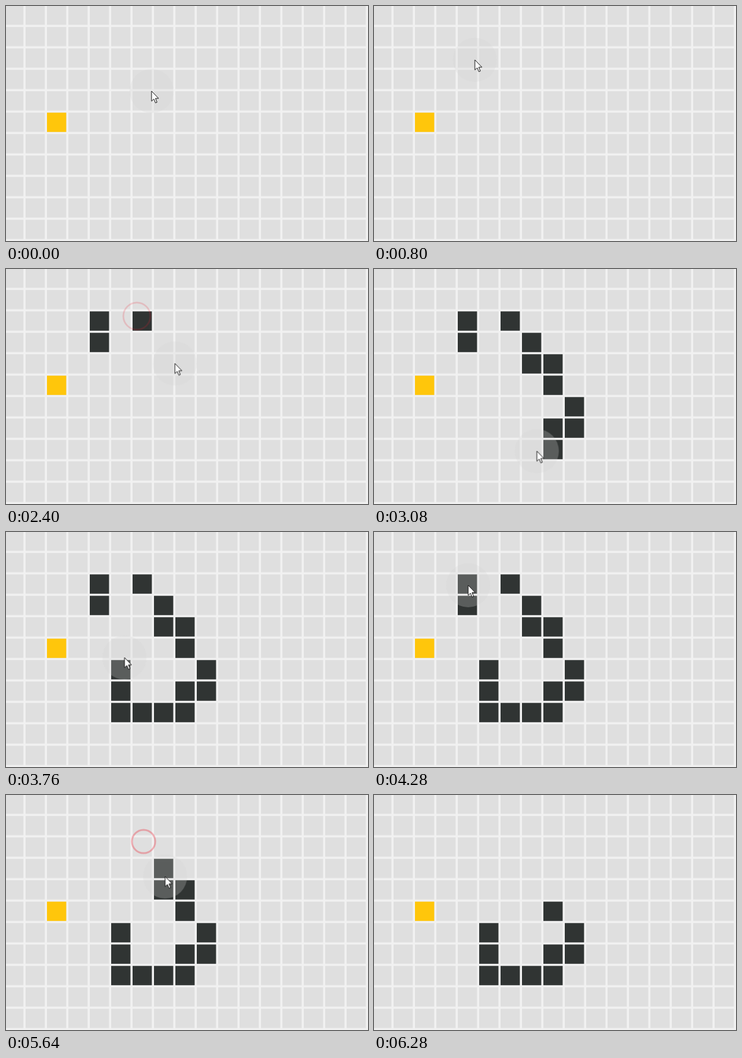
Animation of 592 by 384 pixels, one loop 6.32 s. Source, as an HTML page without scripts:

```html
<!DOCTYPE html>
<html lang="en">
<head>
<meta charset="utf-8">
<title>Grid drawing</title>
<style>
@property --now { syntax: "<number>"; inherits: true; initial-value: 0; }

html, body { margin: 0; width: 100%; height: 100%; overflow: hidden; background: #f1f1f1; }

svg {
  display: block;
  width: 592px;
  height: 384px;
  --off: 9999;
  animation: clock 6320ms linear infinite;
}
@keyframes clock { from { --now: 0; } to { --now: 6320; } }

/* A wall is visible while --on < --now < --off */
.wall use {
  opacity: calc(clamp(0, var(--now) - var(--on), 1) * clamp(0, var(--off) - var(--now), 1));
}

.ring circle {
  fill: none;
  stroke: #ed1c2e;
  opacity: 0;
  animation: ring 6320ms linear infinite;
  animation-delay: calc(var(--t) * 1ms - 6320ms);
}
@keyframes ring {
  0% { r: 1.6px; stroke-width: 4.5px; opacity: 1; }
  1% { stroke-width: 3.5px; opacity: .85; }
  4.3% { stroke-width: 3px; opacity: .35; }
  6.33%, 100% { r: 26px; stroke-width: 2.5px; opacity: 0; }
}

.pointer { animation: move 6320ms linear infinite; }
@keyframes move {
  0% { transform: translate(238px, 139px); animation-timing-function: ease-in-out; }
  10.13%, 12.66% { transform: translate(165px, 88px); }
  14.24% { transform: translate(155px, 88px); }
  17.72% { transform: translate(155px, 88px); animation-timing-function: ease-in-out; }
  22.15% { transform: translate(156px, 112px); }
  23.42% { transform: translate(156px, 115px); }
  25.95% { transform: translate(156px, 115px); animation-timing-function: ease-in-out; }
  31.65%, 35.44% { transform: translate(214px, 77px); }
  37.97% { transform: translate(276px, 154px); }
  39.87% { transform: translate(291px, 180px); }
  42.41% { transform: translate(308px, 201px); }
  43.67% { transform: translate(321px, 226px); }
  44.94% { transform: translate(316px, 256px); }
  46.84% { transform: translate(294px, 282px); }
  49.05% { transform: translate(262px, 300px); }
  50.63% { transform: translate(232px, 303px); }
  52.53% { transform: translate(197px, 296px); }
  54.43% { transform: translate(184px, 280px); }
  57.59% { transform: translate(187px, 230px); }
  59.49% { transform: translate(194px, 206px); }
  61.08% { transform: translate(174px, 136px); }
  62.66% { transform: translate(222px, 184px); }
  64.24% { transform: translate(268px, 160px); animation-timing-function: ease-out; }
  67.72% { transform: translate(154px, 87px); }
  70.25% { transform: translate(154px, 87px); animation-timing-function: ease-in-out; }
  73.42% { transform: translate(154px, 121px); }
  76.58% { transform: translate(154px, 121px); animation-timing-function: ease-in-out; }
  82.91% { transform: translate(225px, 82px); }
  84.49%, 86.39% { transform: translate(225px, 76px); }
  89.24% { transform: translate(260px, 133px); }
  91.14% { transform: translate(284px, 150px); }
  93.35% { transform: translate(285px, 150px); animation-timing-function: ease-in; }
  99.2%, 100% { transform: translate(468px, -40px); }
}
</style>
</head>
<body>
<svg viewBox="0 0 592 384">
  <defs>
    <pattern id="grid" x="-3" y="-.7" width="35" height="35" patternUnits="userSpaceOnUse">
      <rect width="31.5" height="31.5" fill="#dfdfdf"/>
    </pattern>
    <rect id="cell" width="31.5" height="31.5"/>
  </defs>

  <rect width="592" height="384" fill="#f1f1f1"/>
  <rect width="592" height="384" fill="url(#grid)"/>
  <use href="#cell" x="67" y="174.3" fill="#ffc60b"/>

  <g class="wall" fill="#303433">
    <use href="#cell" x="137" y="69.3" style="--on:1060;--off:4460"/>
    <use href="#cell" x="137" y="104.3" style="--on:1620;--off:4700"/>
    <use href="#cell" x="207" y="69.3" style="--on:2200;--off:5490"/>
    <use href="#cell" x="242" y="104.3" style="--on:2440;--off:5680"/>
    <use href="#cell" x="242" y="139.3" style="--on:2480;--off:5740"/>
    <use href="#cell" x="277" y="139.3" style="--on:2530;--off:5820"/>
    <use href="#cell" x="277" y="174.3" style="--on:2600"/>
    <use href="#cell" x="312" y="209.3" style="--on:2740"/>
    <use href="#cell" x="312" y="244.3" style="--on:2820"/>
    <use href="#cell" x="277" y="244.3" style="--on:2900"/>
    <use href="#cell" x="277" y="279.3" style="--on:2990"/>
    <use href="#cell" x="242" y="279.3" style="--on:3100"/>
    <use href="#cell" x="207" y="279.3" style="--on:3240"/>
    <use href="#cell" x="172" y="279.3" style="--on:3380"/>
    <use href="#cell" x="172" y="244.3" style="--on:3500"/>
    <use href="#cell" x="172" y="209.3" style="--on:3620"/>
  </g>

  <circle class="pointer" r="36" fill="#d3d3d3" fill-opacity=".26"/>

  <g class="ring">
    <circle cx="155" cy="88" style="--t:960"/>
    <circle cx="156" cy="115" style="--t:1500"/>
    <circle cx="214" cy="77" style="--t:2065"/>
    <circle cx="154" cy="87" style="--t:4340"/>
    <circle cx="225" cy="76" style="--t:5355"/>
  </g>

  <path class="pointer" d="M0 0V16.5L3.8 13 6.5 19.3 9 18.2 6.4 12H11.5Z"
        fill="#fff" stroke="#111" stroke-linejoin="round"/>
</svg>
</body>
</html>
```
